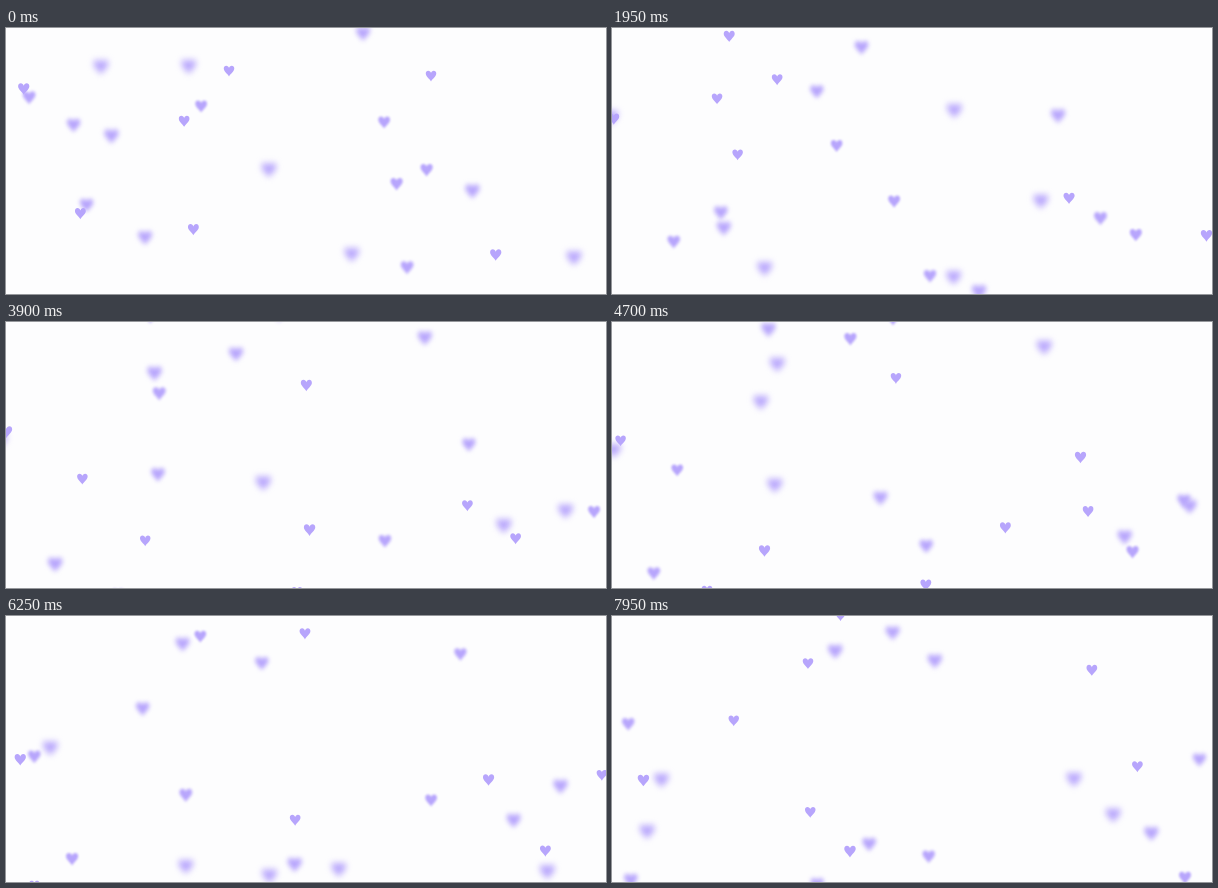
Animation of 600x266 px, one loop 8 s. Source, as an HTML page with a canvas:

```html
<!DOCTYPE html>
<html lang="en">
<head>
<meta charset="utf-8">
<title>Drifting hearts</title>
<style>
  html, body { margin: 0; width: 100%; height: 100%; overflow: hidden; background: #fdfdfe; }
  canvas { display: block; width: 100%; height: 100%; }
</style>
</head>
<body>
<canvas id="stage" width="600" height="266"></canvas>
<script>
const LOOP = 8000, STEP = 50;
const FOCUS_PERIOD = 5.6, MAX_BLUR = 3.2;
const WALLS = { left: -14, right: 605, top: -13, bottom: 277 };

// Start point (px) and velocity (px/s), in the order in which the hearts come into focus
const hearts = [
  [223, 43, 12.1, -13.8], [178, 93, 12.5, -16.6], [74, 185, -7.3, 13.6],
  [489, 226, 17.1, -10.7], [194, 77, 15.2, 20.3], [419, 140, 19.2, 15.1],
  [21, 67, -10, 12.1], [65, 94, 20.5, -12], [354, 2, 15.8, -10.3],
  [102, 104, 12.1, 11.6], [179, 34, -7.2, 8.9], [91, 34, 13.2, -13.5],
  [564, 225, 15.2, -9.4], [259, 137, 11.2, 17.9], [342, 222, -13.2, 12.3],
  [463, 159, 11.9, 14.7], [136, 206, -15.3, -12.6], [78, 174, 15.7, 11.5],
  [399, 237, -18.2, 11.6], [389, 154, 18.5, 7.5], [377, 93, -19.8, -7.8],
  [17, 60, -11.4, 12.5], [187, 201, -19.6, 17.9], [299, 273, 20, -14.4],
  [425, 48, 9.1, 18.4]
];

const canvas = document.getElementById('stage');
const ctx = canvas.getContext('2d');
const heartShape = new Path2D(
  'M0 6C-1.3 3.2 -5.7 .6 -5.7 -2.7C-5.7 -4.6 -4.5 -5.7 -3 -5.7' +
  'C-1.5 -5.7 -.4 -4.7 0 -3.2C.4 -4.7 1.5 -5.7 3 -5.7' +
  'C4.5 -5.7 5.7 -4.6 5.7 -2.7C5.7 .6 1.3 3.2 0 6Z');

// Folds a straight path back between two walls
function bounce(value, min, max) {
  const span = max - min;
  const distance = ((value - min) % (2 * span) + 2 * span) % (2 * span);
  return min + (distance < span ? distance : 2 * span - distance);
}

function drawHeart([x0, y0, vx, vy], index, t) {
  const focusTurn = (index + 0.5) / hearts.length;
  const soft = (1 - Math.cos(2 * Math.PI * (t / FOCUS_PERIOD - focusTurn))) / 2;
  const x = bounce(x0 + vx * t, WALLS.left, WALLS.right);
  const y = bounce(y0 + vy * t, WALLS.top, WALLS.bottom);
  const blur = MAX_BLUR * soft;
  const scale = 0.92 + 0.36 * soft;
  ctx.filter = blur > 0.1 ? `blur(${blur.toFixed(2)}px)` : 'none';
  // Softer hearts grow towards the lower right
  ctx.setTransform(scale, 0, 0, scale, x + 4 * soft, y + 5 * soft);
  ctx.fill(heartShape);
}

function render(now) {
  const t = Math.floor((now % LOOP) / STEP) * STEP / 1000;
  ctx.setTransform(1, 0, 0, 1, 0, 0);
  ctx.filter = 'none';
  ctx.fillStyle = '#fdfdfe';
  ctx.fillRect(0, 0, canvas.width, canvas.height);
  ctx.fillStyle = '#b7a5fc';
  hearts.forEach((heart, index) => drawHeart(heart, index, t));
}

const start = performance.now();
function tick() {
  render(performance.now() - start);
  requestAnimationFrame(tick);
}
tick();
</script>
</body>
</html>
```
